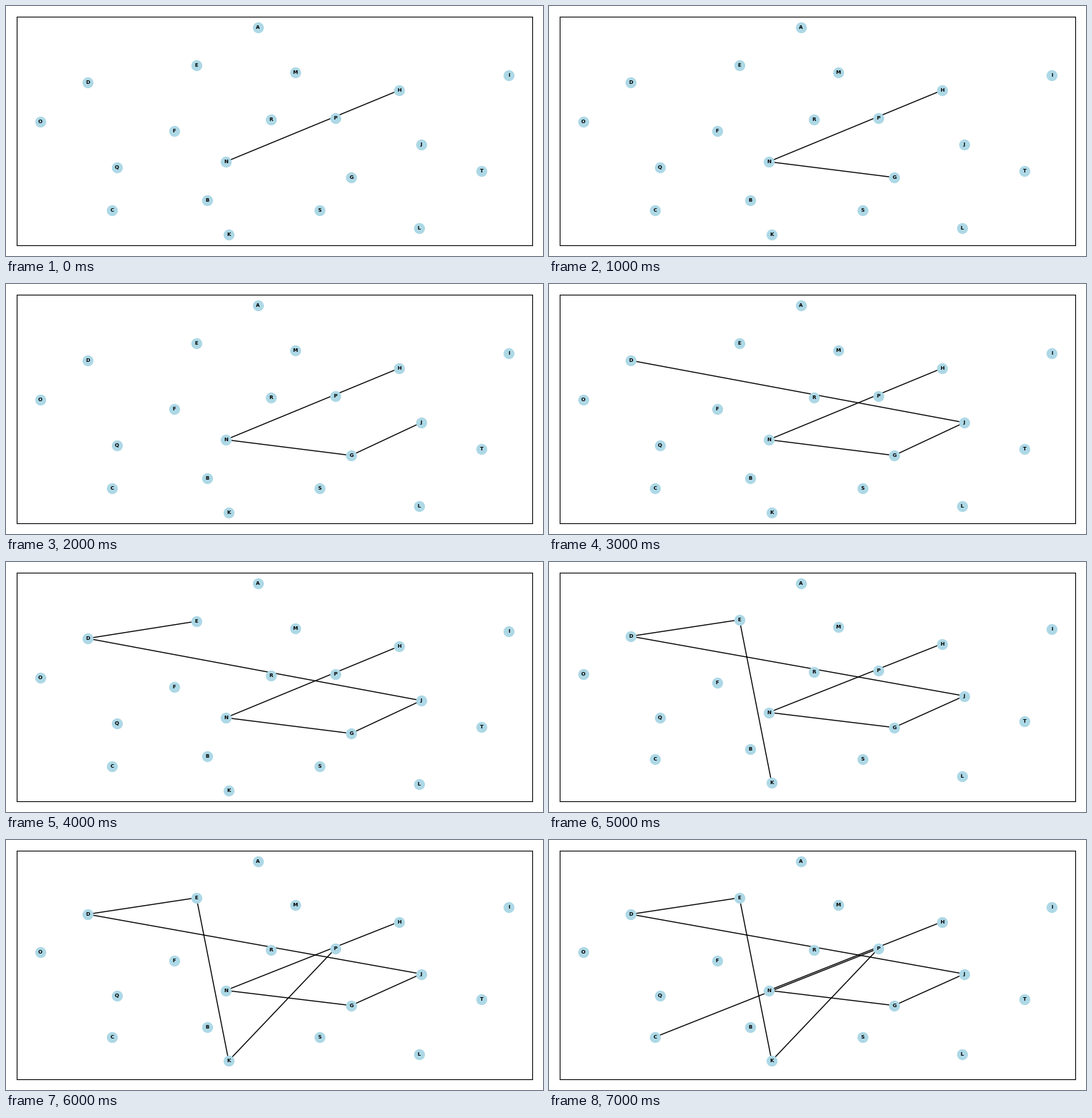
Animation, 750 px wide and 350 px high, one loop 8 s. Source, as a matplotlib script:

```python
import matplotlib.pyplot as plt
from matplotlib.animation import FuncAnimation
from matplotlib.collections import LineCollection

W, H, DPI = 750, 350, 100
LEFT, TOP, RIGHT, BOTTOM = 15, 15, 735, 335
TOP_NODE = 29.55      # the highest node keeps its place when the view rescales
SQUEEZE = 0.9606      # vertical scale once the view has grown
SQUEEZE_FRAME = 5
ROUTE = "HNGJDEKPC"

NODES = {
    "A": (352, TOP_NODE), "B": (281, 272), "C": (148, 286), "D": (114, 107),
    "E": (266, 83), "F": (235, 175), "G": (482, 240), "H": (549, 118),
    "I": (702.3, 97), "J": (580, 194), "K": (311, 320.45), "L": (577, 311),
    "M": (404, 93), "N": (307, 218), "O": (47.7, 162), "P": (460, 157),
    "Q": (155, 226), "R": (370, 159), "S": (438, 286), "T": (664, 231),
}

fig = plt.figure(figsize=(W / DPI, H / DPI), dpi=DPI, facecolor="white")
ax = fig.add_axes([LEFT / W, 1 - BOTTOM / H,
                   (RIGHT - LEFT) / W, (BOTTOM - TOP) / H])
ax.set(xlim=(LEFT, RIGHT), ylim=(BOTTOM, TOP), xticks=[], yticks=[])

edges = LineCollection([], colors="black", linewidths=1.0, zorder=1)
ax.add_collection(edges, autolim=False)
dots = ax.scatter(*zip(*NODES.values()), s=100, c="lightblue",
                  linewidths=1.0, zorder=2)
labels = {name: ax.text(x, y, name, size=5, weight="bold", family="DejaVu Sans",
                        ha="center", va="center", zorder=3)
          for name, (x, y) in NODES.items()}


def layout(frame):
    k = SQUEEZE if frame >= SQUEEZE_FRAME else 1
    return {name: (x, TOP_NODE + (y - TOP_NODE) * k)
            for name, (x, y) in NODES.items()}


def draw(frame):
    pos = layout(frame)
    dots.set_offsets(list(pos.values()))
    for name, label in labels.items():
        label.set_position(pos[name])
    stops = [pos[name] for name in ROUTE[:frame + 2]]
    edges.set_segments(list(zip(stops, stops[1:])))
    return [edges, dots, *labels.values()]


anim = FuncAnimation(fig, draw, frames=len(ROUTE) - 1, interval=1000,
                     repeat=True, repeat_delay=0)
plt.show()
```
